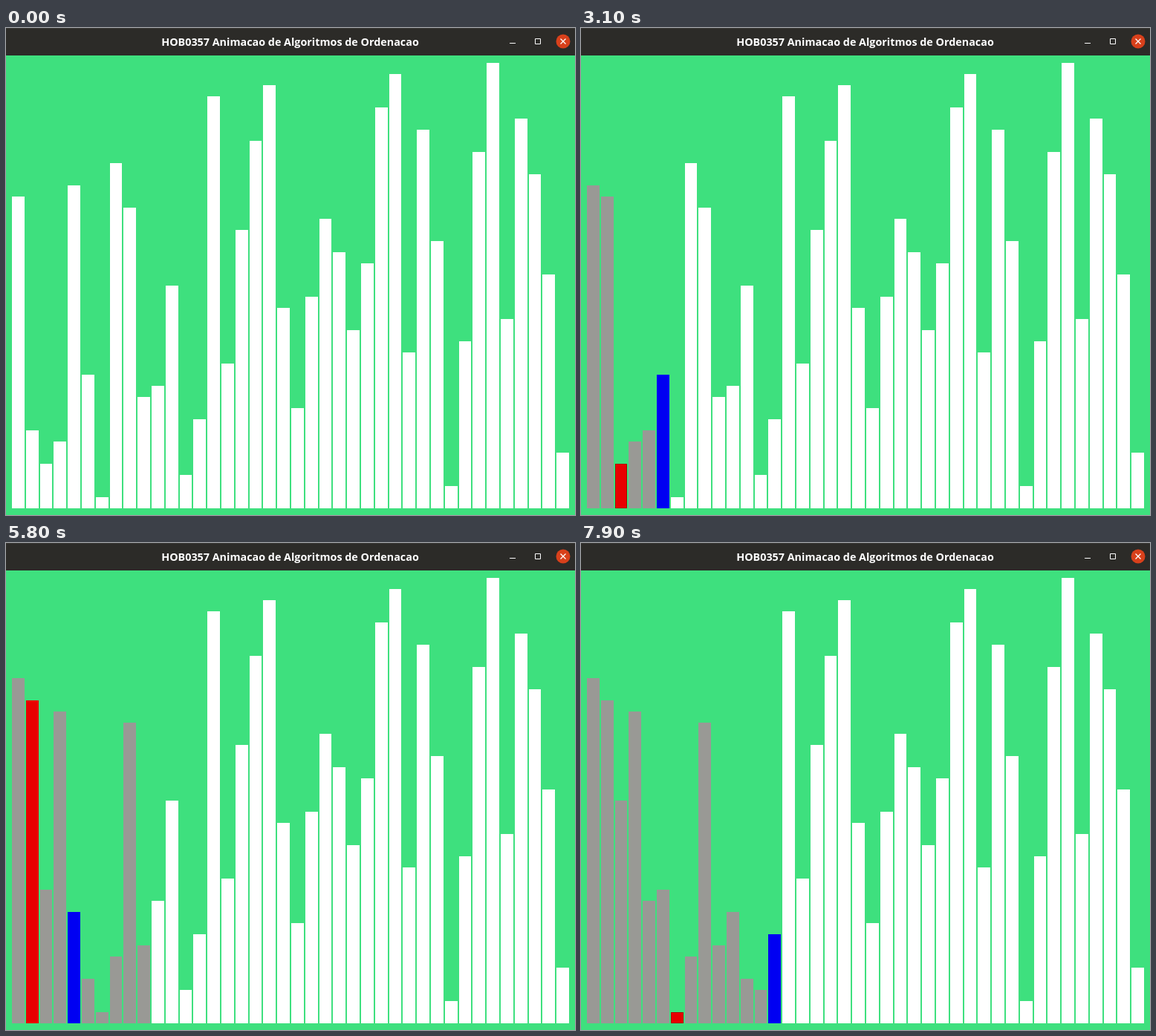
Recreate the animation shown at these times as an HTML page with a canvas. Size 766x656 px, loop 8000 ms.

```html
<!DOCTYPE html>
<html lang="pt">
<head>
<meta charset="utf-8">
<title>Animacao de Algoritmos de Ordenacao</title>
<style>
html, body { margin: 0; width: 100%; height: 100%; overflow: hidden; background: #3ee07e; }
canvas { position: absolute; top: 0; left: 0; }
header {
  position: absolute; top: 0; left: 0; width: 766px; height: 37px;
  background: #2c2b28; box-shadow: inset 0 1px #3a3935;
}
text { font: bold 14.35px "Open Sans", "Noto Sans", sans-serif; fill: #fff; text-anchor: middle; }
</style>
</head>
<body>
<canvas id="stage" width="766" height="656"></canvas>
<header>
  <svg width="766" height="37">
    <text x="382.5" y="24">HOB0357 Animacao de Algoritmos de Ordenacao</text>
    <g fill="none" stroke="#fff">
      <path d="M678 20.5h8M712.5 14.5h7v7h-7z"/>
      <circle cx="750" cy="18" r="9.5" fill="#d8401b" stroke="none"/>
      <path d="M746.5 14.5l7 7m0-7l-7 7" stroke-width="1.3"/>
    </g>
  </svg>
</header>
<script>
const LOOP = 8000, FRAME = 100, TICK = 125, START = 878;
const values = [
  28, 7, 4, 6, 29, 12, 1, 31, 27, 10, 11, 20, 3, 8, 37, 13, 25, 33, 38, 18,
  9, 19, 26, 23, 16, 22, 36, 39, 14, 34, 24, 2, 15, 32, 40, 17, 35, 30, 21, 5
];
const ctx = document.getElementById("stage").getContext("2d");

// Insert bars one by one into a max-heap, recording a state per tick.
function buildHeap(count) {
  const a = [...values], states = [];
  const save = (size, blue = -1, red = -1, edge = false) =>
    states.push({ bars: [...a], size, blue, red, edge });
  save(0);
  for (let i = 0; i < count; i++) {
    let j = i;
    while (j > 0) {
      const p = (j - 1) >> 1, first = j === i;
      save(i + 1, j, p, first);
      if (a[j] <= a[p]) break;
      if (first) save(i + 1, j, p, true);
      [a[j], a[p]] = [a[p], a[j]];
      save(i + 1, p, j);
      j = p;
    }
    if (j === 0) {
      save(i + 1, 0);
      save(i + 1, 0);
    }
    save(i + 1);
  }
  return states;
}

const states = buildHeap(14);

function draw({ bars, size, blue, red, edge }) {
  ctx.fillStyle = "#3ee07e";
  ctx.fillRect(0, 0, 766, 656);
  bars.forEach((v, i) => {
    const left = 8 + i * 18.8, x = Math.round(left);
    const w = Math.round(left + 16.8) - x, h = v * 15, y = 647 - h;
    ctx.fillStyle = i === blue ? "#0000f2" : i === red ? "#e80000" : i < size ? "#999995" : "#fff";
    ctx.fillRect(x, y, w, h);
    if (i === red && edge) {
      ctx.strokeStyle = "#b00000";
      ctx.strokeRect(x + 0.5, y + 0.5, w - 1, h - 1);
    }
  });
}

function render(now) {
  const t = Math.floor(now % LOOP / FRAME) * FRAME;
  const step = Math.floor((t - START) / TICK) + 1;
  draw(states[Math.max(0, step)]);
  requestAnimationFrame(render);
}
requestAnimationFrame(render);
</script>
</body>
</html>
```
